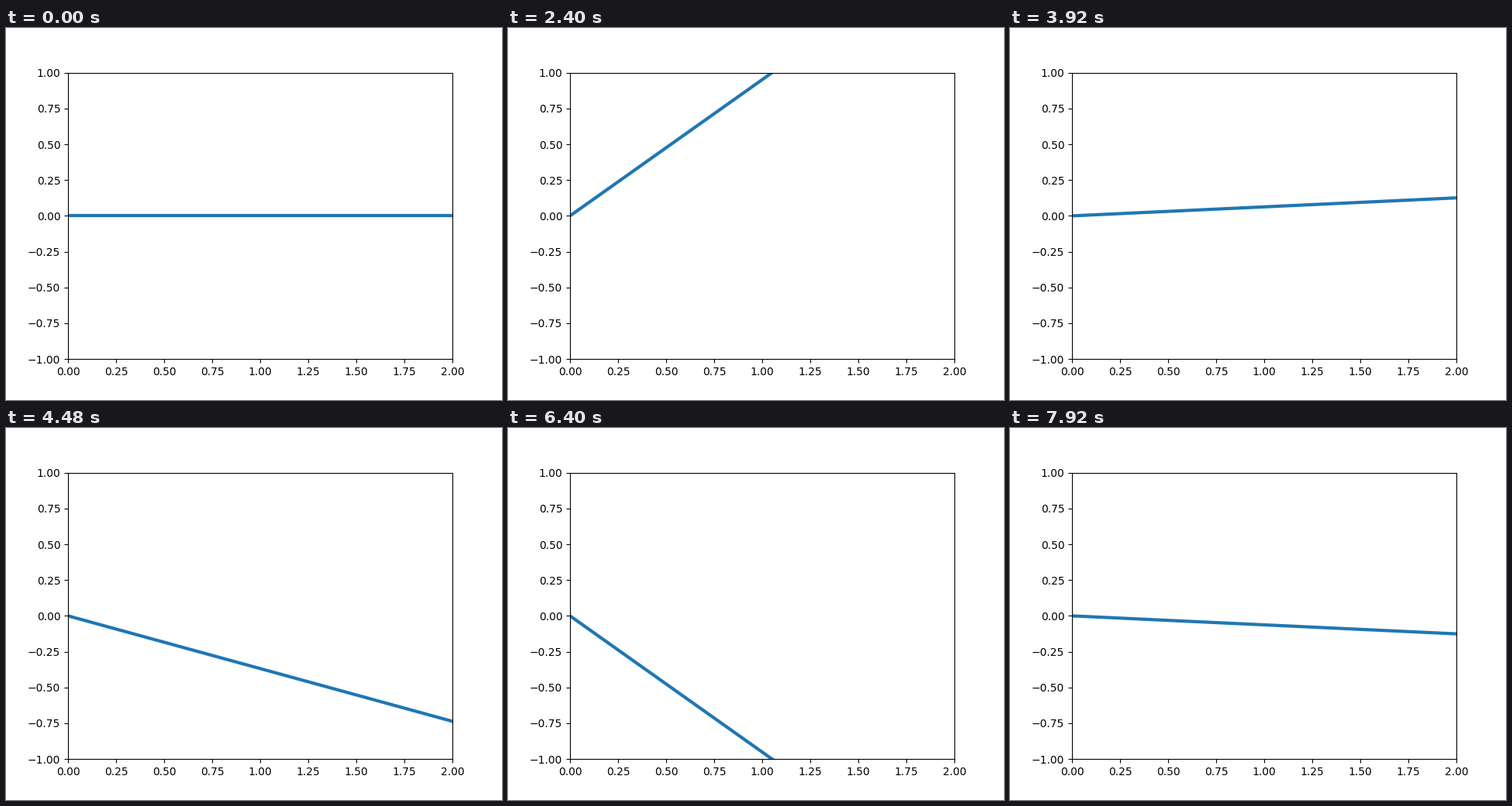
A matplotlib script for the animation above (8 s loop, 640 by 480 pixels).

```python
import numpy as np
import matplotlib.pyplot as plt
from matplotlib.animation import FuncAnimation

FRAMES = 100
INTERVAL = 80

plt.rcParams["font.family"] = "DejaVu Sans"

fig = plt.figure(figsize=(6.4, 4.8), dpi=100)
ax = fig.add_subplot(xlim=(0, 2), ylim=(-1, 1))
x = np.linspace(0, 2, 1000)
line, = ax.plot(x, 0 * x, lw=3, color="#1f77b4")


def update(i):
    # The slope swings through one sine period per loop.
    slope = np.sin(2 * np.pi * i / FRAMES)
    line.set_data(x, slope * x)
    return line,


anim = FuncAnimation(fig, update, frames=FRAMES, interval=INTERVAL,
                     repeat=True, repeat_delay=0)
plt.show()
```
